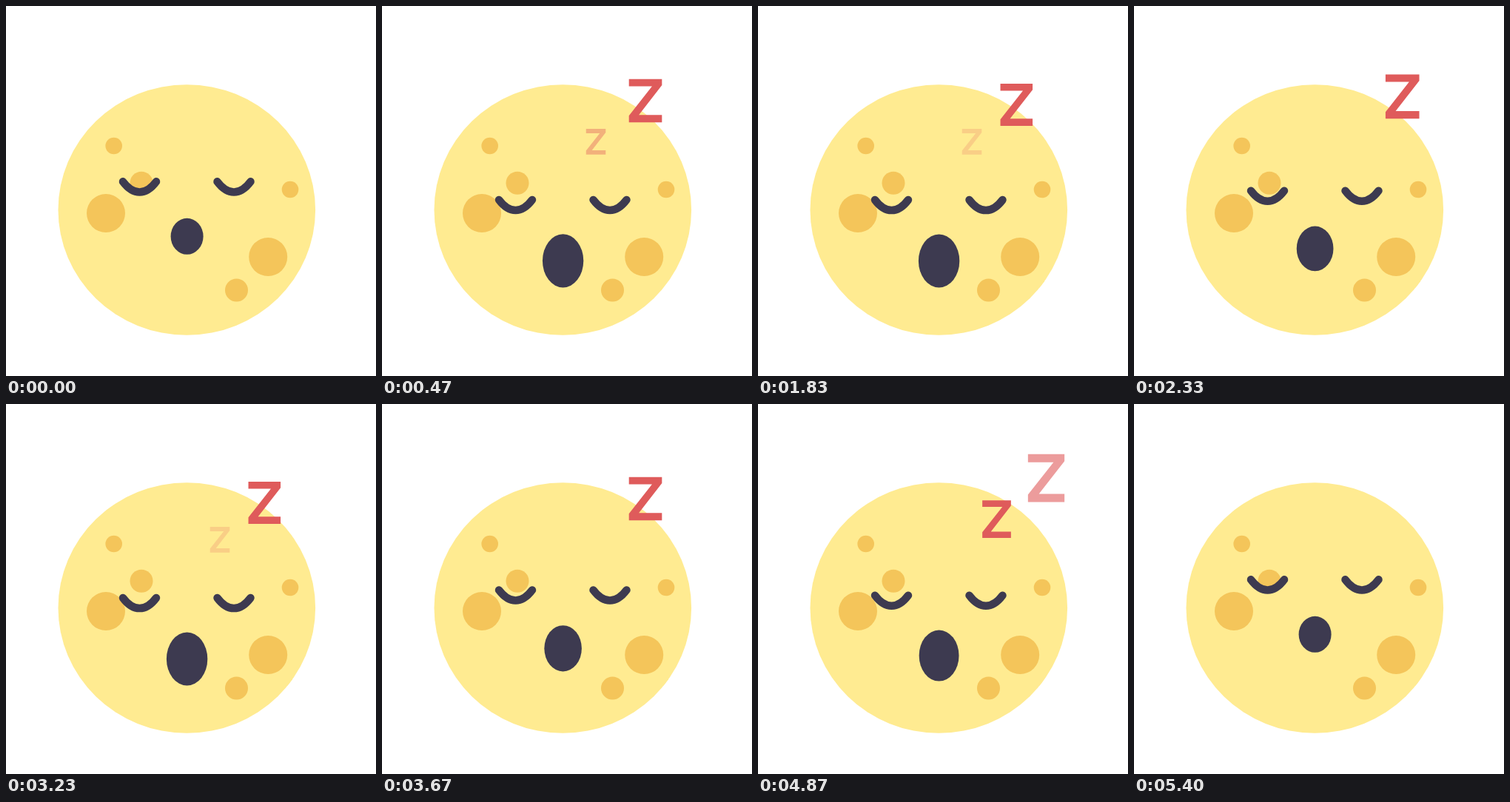
Recreate the animation shown at these times as an HTML page. Size 500 by 500 pixels, loop 5560 ms.

```html
<!DOCTYPE html>
<html lang="en">
<head>
<meta charset="utf-8">
<title>Sleeping moon</title>
<style>
  html, body { margin: 0; width: 100%; height: 100%; overflow: hidden; background: #fff; }
  svg { display: block; width: 100%; height: 100%; }
</style>
</head>
<body>
<svg viewBox="0 0 500 500">
  <defs>
    <path id="eye" d="M-22.5 0C-8.5 18.8 8.5 18.8 22.5 0" fill="none"
      stroke="#3d3a50" stroke-width="10.5" stroke-linecap="round"/>
    <path id="zed" d="M-22.5-29.5h45v8.5L-9 19.5H22.5v10h-45v-9L9-19.5H-22.5z" fill="#df5b5b"/>
  </defs>
  <ellipse cx="244.3" cy="275.5" rx="173.8" ry="169.3" fill="#ffeb91"/>
  <g fill="#f4c55a">
    <circle cx="145.7" cy="189" r="11.3"/>
    <circle cx="183" cy="239.3" r="15.5"/>
    <circle cx="135" cy="280" r="26"/>
    <circle cx="384" cy="248" r="11.3"/>
    <circle cx="354.2" cy="339" r="26"/>
    <circle cx="311.5" cy="384" r="15.5"/>
  </g>
  <g id="eyes">
    <use href="#eye" x="180.5" y="237.3"/>
    <use href="#eye" x="308" y="237.3"/>
  </g>
  <ellipse id="mouth" cx="244.6" fill="#3d3a50"/>
  <use id="firstZ" href="#zed"/>
  <use id="secondZ" href="#zed"/>
</svg>
<script>
const LOOP = 5560;
const BREATH_TICKS = 42;
const get = id => document.getElementById(id);
const eyes = get('eyes'), mouth = get('mouth');
const firstZ = get('firstZ'), secondZ = get('secondZ');
const clamp = (v, lo, hi) => Math.min(hi, Math.max(lo, v));

// Poses run at 25 per second, shown on a 30 per second clock.
function poseAt(time) {
  const tick = Math.floor(time * 0.03 + 0.11) % BREATH_TICKS;
  return Math.ceil(tick * 5 / 6 - 0.5);
}

// Quick inhale, slower exhale.
function breath(pose) {
  if (pose <= 1 || pose >= 29) return 0;
  return pose < 11
    ? Math.sin((pose - 1) / 10 * Math.PI / 2)
    : Math.cos((pose - 11) / 18 * Math.PI / 2);
}

function drawZ(node, pose, birth, death) {
  const visible = pose >= birth && pose < death;
  node.setAttribute('visibility', visible ? 'visible' : 'hidden');
  if (!visible) return;
  const age = Math.max(0, pose - (death - 18));
  const x = 289 + 6.7 * age;
  const y = 183.4 - 5.55 * age;
  const width = 26.5 + 24.5 * Math.pow(age / 17, 0.57);
  const opacity = clamp(Math.min((pose - birth + 1) / 5, (death - pose) / 5), 0, 1);
  node.setAttribute('transform', `translate(${x} ${y}) scale(${width / 45})`);
  node.setAttribute('opacity', opacity);
}

function draw(time) {
  const pose = poseAt(time);
  const open = breath(pose);
  eyes.setAttribute('transform', `translate(0 ${24.7 * open})`);
  mouth.setAttribute('cy', 311.3 + 33.2 * open);
  mouth.setAttribute('rx', 22 + 5.7 * open);
  mouth.setAttribute('ry', 24.5 + 11.6 * open);
  drawZ(firstZ, pose, 2, 20);
  drawZ(secondZ, pose, 11, 30);
}

const start = performance.now();
function loop(now) {
  draw(Math.max(0, now - start) % LOOP);
  requestAnimationFrame(loop);
}
draw(0);
requestAnimationFrame(loop);
</script>
</body>
</html>
```
